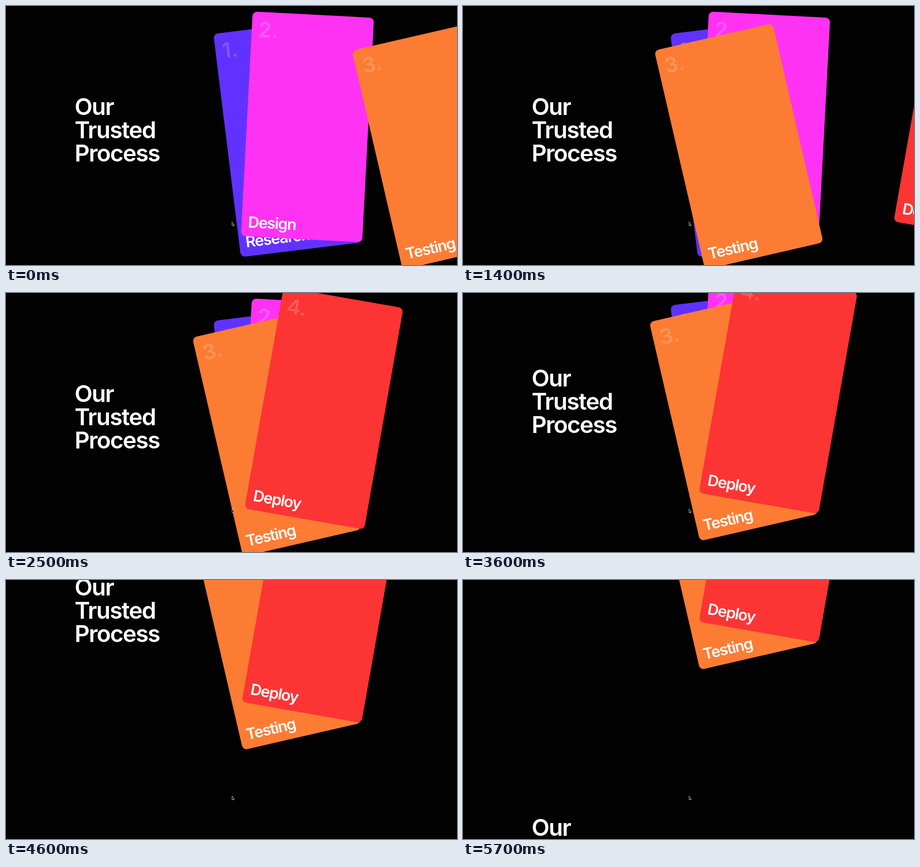
These frames come from a looping animation (986 px wide and 568 px high, 5800 ms). An HTML page:

```html
<!DOCTYPE html>
<html lang="en">
<head>
<meta charset="utf-8">
<title>Our Trusted Process</title>
<style>
  html, body { margin: 0; width: 100%; height: 100%; overflow: hidden; background: #020202; }
  svg { display: block; width: 986px; height: 568px; }
  text { fill: #fff; font-family: Inter, "Liberation Sans", sans-serif; font-weight: 600; font-optical-sizing: none; }
  .title { font-size: 51px; letter-spacing: -0.036em; }
  .label { font-size: 34px; letter-spacing: -0.049em; }
  .num { font-size: 46px; opacity: .18; }
</style>
</head>
<body>
<svg viewBox="0 0 986 568">
  <g id="page">
    <g id="title" class="title">
      <text x="149.9" y="239.1">Our</text>
      <text x="149.9" y="290.1">Trusted</text>
      <text x="149.9" y="341.1">Process</text>
    </g>
    <use href="#title" y="703"/>
    <g id="cards"></g>
  </g>
  <path d="M494.2 473.6v8.2l1.7-1.5 1.2 2.5 1.3-.6-1.2-2.5h2z" fill="#000" stroke="#e8e8e8" stroke-width=".8"/>
</svg>
<script>
const LOOP = 5800, STEP = 100;
const W = 265.5, H = 493;

// Slides are [time, distance from the resting place].
const cards = [
  { name: 'Research', fill: '#6132ff', x: 615.2, y: 289.8, turn: -7, slide: [[0, 0]] },
  { name: 'Design', fill: '#ff32f3', x: 657.2, y: 265.2, turn: 3, slide: [[0, 1.8], [300, 0]] },
  { name: 'Testing', fill: '#fd7c33', x: 592, y: 308, turn: -13,
    slide: [[0, 349], [500, 176], [1400, 11], [2000, 0]] },
  { name: 'Deploy', fill: '#fc3434', x: 689, y: 252.8, turn: 10,
    slide: [[0, 900], [1000, 580], [1400, 426], [2400, 31], [2500, 6], [2800, 0]] }
];
const scroll = [[3100, 0], [3600, -34], [4200, -157], [4600, -205], [4800, -213], [5400, -290], [5700, -381]];

const page = document.getElementById('page');
const deck = document.getElementById('cards');

deck.innerHTML = cards.map((c, i) => `<g>
  <rect width="${W}" height="${H}" rx="10" fill="${c.fill}"/>
  <text class="num" x="14.5" y="55">${i + 1}.</text>
  <text class="label" x="14.3" y="473.5">${c.name}</text>
</g>`).join('');

// Smooth curve through the keys that never overshoots them.
function curve(keys, t) {
  const last = keys.length - 1;
  if (t <= keys[0][0]) return keys[0][1];
  if (t >= keys[last][0]) return keys[last][1];
  const rise = i => (keys[i + 1][1] - keys[i][1]) / (keys[i + 1][0] - keys[i][0]);
  const slope = i => {
    if (i === 0) return rise(0);
    if (i === last) return 0;
    const a = rise(i - 1), b = rise(i);
    return a * b > 0 ? 2 * a * b / (a + b) : 0;
  };
  const i = keys.findIndex(k => k[0] > t) - 1;
  const [t0, v0] = keys[i], [t1, v1] = keys[i + 1];
  const d = t1 - t0, u = (t - t0) / d, r = 1 - u;
  return r * r * ((1 + 2 * u) * v0 + u * d * slope(i))
       + u * u * ((3 - 2 * u) * v1 - r * d * slope(i + 1));
}

function draw(now) {
  const t = Math.floor((now % LOOP + 2) / STEP) * STEP % LOOP;
  page.setAttribute('transform', `translate(0 ${curve(scroll, t)})`);
  cards.forEach((c, i) => deck.children[i].setAttribute('transform',
    `translate(${c.x + curve(c.slide, t)} ${c.y}) rotate(${c.turn}) translate(${-W / 2} ${-H / 2})`));
}

const start = performance.now();
function tick() {
  draw(performance.now() - start);
  requestAnimationFrame(tick);
}
tick();
</script>
</body>
</html>
```
